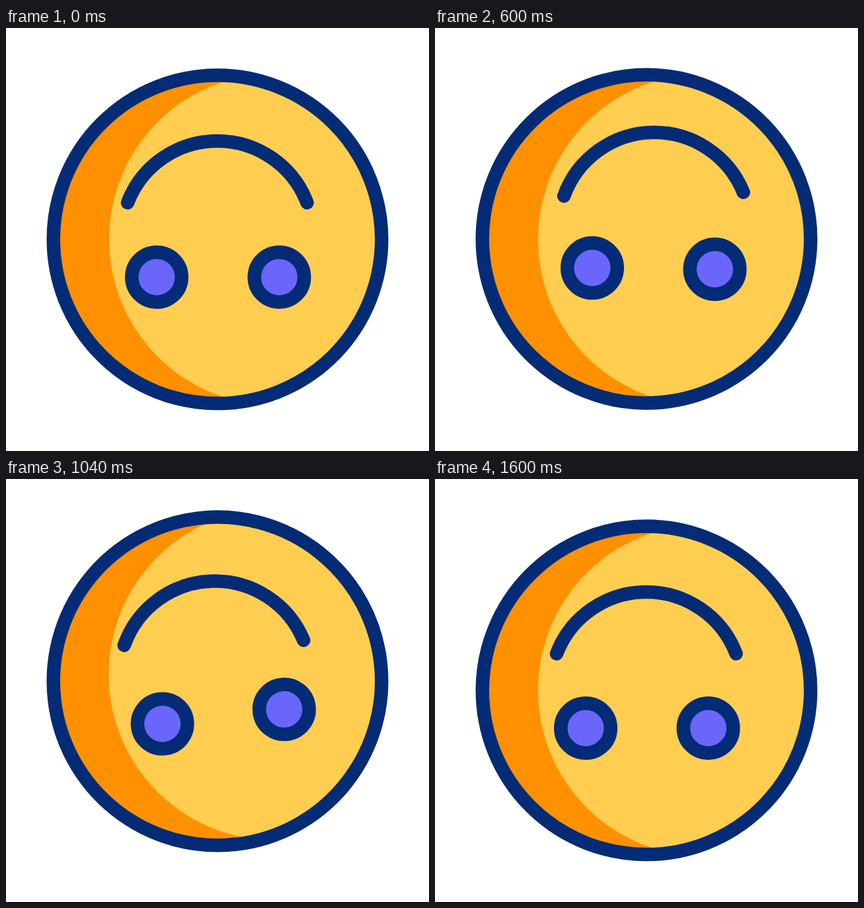
An HTML page for the animation above (2000 ms loop, 640 px wide and 640 px high).

```html
<!DOCTYPE html>
<html lang="en">
<head>
<meta charset="utf-8">
<title>Upside-down smiley</title>
<style>
  html, body { margin: 0; width: 100%; height: 100%; overflow: hidden; background: #fff; }
  svg { display: block; width: 100vw; height: 100vh; }
  .line { stroke: #042b76; stroke-width: 20.5; stroke-linecap: round; }
</style>
</head>
<body>
<svg viewBox="0 0 640 640">
  <defs>
    <clipPath id="disc"><circle r="248"/></clipPath>
  </defs>
  <g id="head">
    <circle r="248" fill="#ff9100"/>
    <g clip-path="url(#disc)"><circle cx="86.7" r="250.7" fill="#ffce51"/></g>
    <circle class="line" r="248.3" fill="none"/>
    <g id="features">
      <path id="mouth" class="line" fill="none" d="M-135.75 0A145.4 145.4 0 0 1 135.75 0"/>
      <ellipse class="eye line" cx="-92" cy="57.1" rx="37.75" ry="37.75" fill="#6a66fa"/>
      <ellipse class="eye line" cx="93.5" cy="57.1" rx="37.75" ry="37.75" fill="#6a66fa"/>
    </g>
  </g>
</svg>
<script>
  const LOOP = 2000, STEP = 40, EYE = 37.75;
  const BLINK_START = 120, BLINK_TIME = 320;

  const head = document.getElementById('head');
  const features = document.getElementById('features');
  const mouth = document.getElementById('mouth');
  const eyes = document.querySelectorAll('.eye');

  const smooth = u => u * u * (3 - 2 * u);

  // Eases from rest through each peak and back to rest.
  // The first move lasts `rise`, the next `beat`, and each later one shrinks.
  function swing(t, peaks, rise, beat, shrink = 1) {
    let from = 0, span = rise, next = beat;
    for (const to of [...peaks, 0]) {
      if (t < span) return from + (to - from) * smooth(t / span);
      t -= span;
      from = to;
      span = next;
      next *= shrink;
    }
    return 0;
  }

  function eyeOpening(t) {
    const u = Math.min(Math.max((t - BLINK_START) / BLINK_TIME, 0), 1);
    return 1 - 0.9 * Math.sin(Math.PI * u) ** 2;
  }

  function draw(t) {
    const y = 319.8 + swing(t, [-38, 36.7, -17.5], 455, 290, 0.82);
    const tilt = swing(t, [-33, 15, -6.8, 2.7], 320, 440, 0.65);
    const dx = swing(t, [15.6, -14, 5], 520, 300);
    const dy = swing(t, [-17, 9.5, -5.5], 520, 300);
    const smile = swing(t, [-16.8, 8.7], 320, 500);

    head.setAttribute('transform', `translate(320 ${y}) rotate(${tilt})`);
    features.setAttribute('transform', `translate(${dx} ${dy})`);
    mouth.setAttribute('transform', `translate(-0.25 -55.5) rotate(${smile})`);
    for (const eye of eyes) eye.setAttribute('ry', EYE * eyeOpening(t));
  }

  const start = performance.now();
  function tick() {
    const t = (performance.now() - start) % LOOP;
    draw(Math.floor(t / STEP) * STEP);
    requestAnimationFrame(tick);
  }
  draw(0);
  requestAnimationFrame(tick);
</script>
</body>
</html>
```
